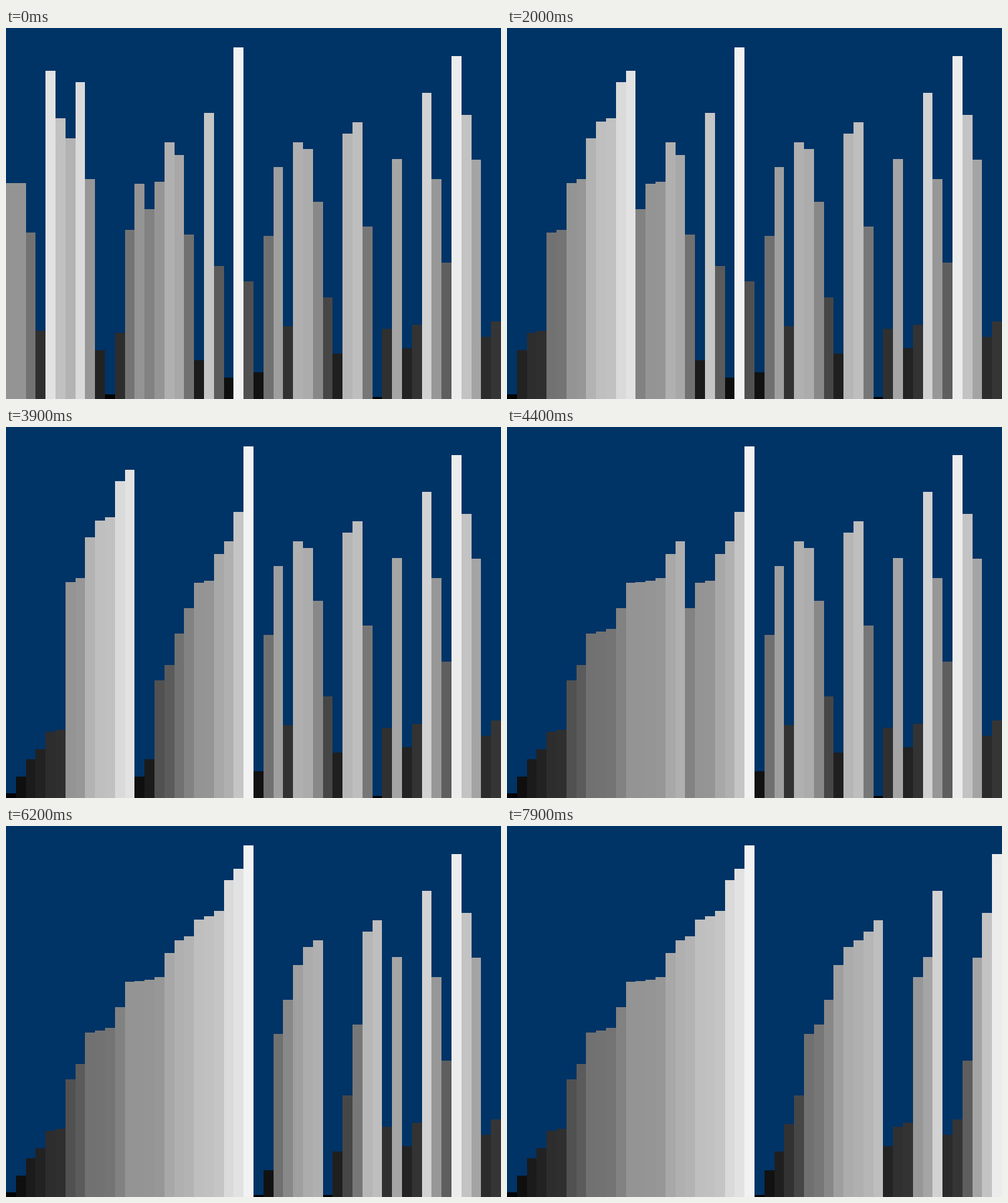
Recreate the animation shown at these times as a matplotlib script. Size 740 px wide and 555 px high, loop 8000 ms.

```python
import matplotlib.pyplot as plt
import numpy as np
from matplotlib.animation import FuncAnimation

WIDTH, HEIGHT, DPI = 740, 555, 100
FRAMES, FRAME_MS, WRITE_MS = 160, 50, 40

tops = [140, 232, 306, 453, 64, 135, 165, 81, 226, 482,
        548, 456, 302, 233, 271, 230, 171, 190, 309, 497,
        127, 356, 523, 29, 379, 515, 311, 208, 446, 171,
        181, 260, 403, 487, 158, 141, 297, 552, 450, 196,
        479, 444, 97, 226, 351, 42, 130, 197, 462, 439]
start_values = [HEIGHT - top for top in tops]


def merge_sort(values, lo, hi):
    """Sort values[lo..hi] in place, yielding the list after every write."""
    if lo >= hi:
        return
    mid = (lo + hi) // 2
    yield from merge_sort(values, lo, mid)
    yield from merge_sort(values, mid + 1, hi)
    left, right = values[lo:mid + 1], values[mid + 1:hi + 1]
    for k in range(lo, hi + 1):
        take_left = left and (not right or left[0] <= right[0])
        values[k] = (left if take_left else right).pop(0)
        yield values.copy()


states = list(merge_sort(start_values.copy(), 0, len(start_values) - 1))

fig = plt.figure(figsize=(WIDTH / DPI, HEIGHT / DPI), dpi=DPI,
                 facecolor="#003366")
ax = fig.add_axes([0, 0, 1, 1])
ax.set_xlim(0, WIDTH)
ax.set_ylim(0, HEIGHT)
ax.axis("off")

edges = np.round(np.linspace(0, WIDTH, len(start_values) + 1))
bars = ax.bar(edges[:-1], start_values, width=np.diff(edges), align="edge",
              linewidth=0, antialiased=False)


def update(frame):
    # Writes come every 40 ms; show the one nearest to this frame's time.
    step = (frame * FRAME_MS + WRITE_MS // 2) // WRITE_MS
    for bar, value in zip(bars, states[step]):
        bar.set_height(value)
        bar.set_facecolor((value / HEIGHT,) * 3)
    return list(bars)


anim = FuncAnimation(fig, update, frames=FRAMES, interval=FRAME_MS,
                     repeat=True, repeat_delay=0)
plt.show()
```
